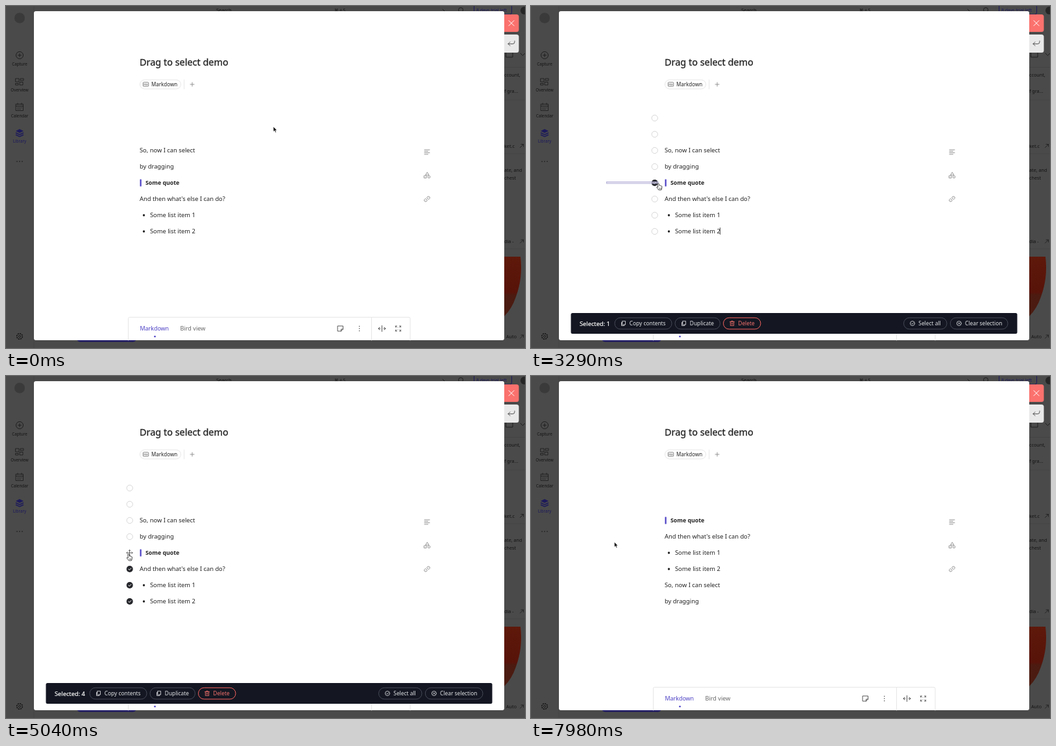
Write an HTML page that moves like this. It is 800 px wide and 528 px high and loops after 8 s.

```html
<!DOCTYPE html>
<html lang="en">
<head>
<meta charset="utf-8">
<title>Drag to select demo</title>
<style>
  html, body { margin: 0; width: 100%; height: 100%; overflow: hidden; background: #4a4a4a; }
  svg { display: block; width: 100vw; height: 100vh; }
  text { font-family: "Noto Sans", "Open Sans", sans-serif; font-size: 9.33px; fill: #222; white-space: pre; }
  .line { fill: none; stroke-linecap: round; stroke-linejoin: round; }
  .title { font-size: 14.45px; stroke: #222; stroke-width: .3px; }
  .dim text { font-size: 7.2px; fill: #141414; }
  .dim .label { font-size: 6.3px; text-anchor: middle; }
  .bar text { font-size: 8.35px; fill: #e4e4e8; }
  .bar .count { font-size: 9.25px; fill: #fff; stroke: #fff; stroke-width: .2px; }
</style>
</head>
<body>
<svg id="stage" viewBox="0 0 800 528" preserveAspectRatio="none"></svg>
<script>
const LOOP = 8000, STEP = 70;
const ROW_TOP = 173, ROW_GAP = 25;
const DRAG_START = 2870, DRAG_END = 4410, DROP = 6160;
const INK = '#222', PURPLE = '#4b3fc4';

const rowY = i => ROW_TOP + i * ROW_GAP;
const text = (x, y, s, attrs = '') => `<text x="${x}" y="${y}" ${attrs}>${s}</text>`;
const path = (d, stroke, width = 1, attrs = '') =>
  `<path class="line" d="${d}" stroke="${stroke}" stroke-width="${width}" ${attrs}/>`;
const box = (x, y, w, h, r, attrs) =>
  `<rect x="${x}" y="${y}" width="${w}" height="${h}" rx="${r}" ${attrs}/>`;
const dot = (x, y, r, fill) => `<circle cx="${x}" cy="${y}" r="${r}" fill="${fill}"/>`;
const at = (x, y, s, id = '') => `<g ${id && `id="${id}"`} transform="translate(${x} ${y})">${s}</g>`;

// Page behind the dialog
function backdrop() {
  const dark = '#151515', violet = '#1d1a5c';
  const label = (y, s, fill = dark) => text(21, y, s, `class="label" style="fill:${fill}"`);
  const out = (x, y) => at(x, y, path('M-2.5 2.5L2.5 -2.5M-1 -2.5H2.5V1', dark, .7));
  return `<g class="dim">
    ${box(0, 0, 800, 528, 0, 'fill="#4a4a4a"')}
    ${path('M43 0V528', '#434343', .8)}
    <circle cx="21" cy="18.5" r="8" fill="#3a3a3a"/>
    <circle cx="21" cy="76" r="5.5" fill="none" stroke="${dark}" stroke-width=".8"/>
    ${path('M21 73.5V78.5M18.5 76H23.5', dark, .8)}
    ${label(92, 'Capture')}
    ${path('M15 112H20V117H15ZM22.5 112H27V115H22.5ZM15 119.5H19V122H15ZM21.5 117.5H26V122H21.5Z', dark, .7)}
    ${label(132, 'Overview')}
    ${path('M15.5 151.5H26.5V161.5H15.5ZM15.5 154.5H26.5M18 150V152M24 150V152M18 157H19M21 157H22M24 157H24.5M18 159.3H19M21 159.3H22', dark, .7)}
    ${label(171.5, 'Calendar')}
    <path d="M21 190L27 193L21 196L15 193Z" fill="${violet}"/>
    ${path('M15.5 196L21 198.7L26.5 196M15.5 199L21 201.7L26.5 199', violet, 1.5)}
    ${label(211, 'Library', violet)}
    ${[17, 21, 25].map(x => dot(x, 240, .8, dark)).join('')}
    <circle cx="21" cy="510" r="4.3" fill="none" stroke="${dark}" stroke-width="1.5" stroke-dasharray="2.2 1.1"/>
    <circle cx="21" cy="510" r="1.6" fill="none" stroke="${dark}" stroke-width=".8"/>
    ${text(324, 9, 'Search', 'style="font-size:7.5px"')}
    ${text(506, 9, '⌘ + S', 'style="font-size:6.5px"')}
    ${path('M673 5L676 8', dark, .8)}
    <circle cx="701" cy="6" r="3.5" fill="none" stroke="${dark}" stroke-width=".8"/>
    ${box(721.5, -2, 58, 15, 3, `fill="none" stroke="${violet}"`)}
    ${text(725, 9, '8 days trial left', `style="font-size:6.8px;fill:${violet}"`)}
    ${dot(799, 7, 6, '#262626')}
    ${path('M771 71H781V79H771Z', dark, .8)}${path('M793 73L796.5 76.5L800 73', dark, .8)}
    ${path('M768 94.5H800M768 145H800M768 228H800M768 375H800', '#424242', .8)}
    ${text(768, 109, 'ccount,')}${text(768, 133.5, 'f gra...')}
    ${text(768, 219, 'ket.c')}${out(795, 216)}
    ${text(768, 256, 'ate, and')}${text(768, 268, 'chest')}
    ${text(768, 366, 'dia -')}${out(795, 363.5)}
    ${text(771, 513, 'Auto')}${out(795, 510.5)}
    <path d="M768 387H793Q797 419 786 449Q780 467 768 479Z" fill="url(#pie)"/>
    ${box(109, 508, 92, 10.5, 5, 'fill="#1f1a66"')}
  </g>`;
}

function dialog() {
  const grey = '#8b8b8b', dark = '#444';
  const chainLink = path('M-1 -2H-3A2 2 0 0 0 -3 2H-1M1 -2H3A2 2 0 0 1 3 2H1M-2 0H2', grey, .9, 'transform="rotate(-40)"');
  const corner = (sx, sy) => path('M2 4H4V2M4 4L1.7 1.7', dark, .8, `transform="scale(${sx} ${sy})"`);
  return `
    ${box(43, 8, 725, 508, 3, 'fill="#fff"')}
    <path d="M768 13H787Q790.5 13 790.5 16.5V36.5Q790.5 40 787 40H768Z" fill="#fb716d"/>
    ${path('M775 22.5L783 30.5M783 22.5L775 30.5', '#fff', 1)}
    <path d="M768 44H787Q790.5 44 790.5 47.5V68.5Q790.5 72 787 72H768Z" fill="#e9e9e9"/>
    ${path('M784 54V55.5Q784 58.5 781 58.5H774M777 55.5L774 58.5L777 61.5', '#444', .9)}
    ${text(206, 92.3, 'Drag to select demo', 'class="title"')}
    ${box(206.5, 114, 63, 14, 7, 'fill="#fff" stroke="#e4e4e4" stroke-width=".9"')}
    ${box(211.3, 117.8, 8.4, 6.2, 1, 'fill="none" stroke="#666" stroke-width=".8"')}
    ${path('M213 122.3V119.8L214.2 121.3L215.4 119.8V122.3M217.4 119.8V122M216.6 121.3L217.4 122.2L218.2 121.3', '#666', .6)}
    ${text(224, 124, 'Markdown', 'style="font-size:8px"')}
    ${path('M274.5 114V128', '#e8e8e8')}
    ${path('M284 121H290M287 118V124', grey, .9)}
    ${path('M645 222H653M645 224.3H650.5M645 226.6H653M645 229H650.5', grey, .9)}
    ${path('M649.5 257L652 261H647ZM644.7 262H648V265.5H644.7Z', grey, .9)}
    <circle cx="652" cy="263.8" r="1.8" fill="none" stroke="${grey}" stroke-width=".9"/>
    ${at(649, 298, chainLink)}
    ${path('M188.5 516V482.5Q188.5 480.5 190.5 480.5H621Q623 480.5 623 482.5V516M563.5 480.5V516', '#e6e6e6')}
    ${text(206.5, 501, 'Markdown', `style="font-size:8.9px;fill:${PURPLE}"`)}
    ${text(268.5, 501, 'Bird view', 'style="font-size:9.1px;fill:#666"')}
    ${dot(229.5, 510.3, 1.3, PURPLE)}
    ${path('M511.5 494H519.5V499L516.5 502H511.5ZM519.5 499H516.5V502', dark, .9)}
    ${[494.5, 498, 501.5].map(y => dot(544.7, y, .75, dark)).join('')}
    ${path('M579.5 493.5V502.5M577 498H574M582 498H585M576 496L574 498L576 500M583 496L585 498L583 500', dark, .9)}
    ${at(604.5, 498, corner(1, 1) + corner(-1, 1) + corner(1, -1) + corner(-1, -1))}`;
}

const quote = box(206.5, -5.5, 2.2, 11, .5, `fill="${PURPLE}"`) +
  text(215, 3.3, 'Some quote', 'style="font-size:8.8px;font-weight:600"');
const item = s => dot(212.5, 0, 1.7, INK) + text(222, 3.3, s);

// Each block knows its row before and after the drop.
const blocks = [
  { body: text(206, 3.3, 'So, now I can select'), from: 2, to: 6 },
  { body: text(206, 3.3, 'by dragging'), from: 3, to: 7 },
  { body: quote, from: 4, to: 2 },
  { body: text(206, 3.3, 'And then what\'s else I can do?'), from: 5, to: 3 },
  { body: item('Some list item 1'), from: 6, to: 4 },
  { body: item('Some list item 2'), from: 7, to: 5 },
];

function toolbar() {
  const copy = 'M-1.5 -3.5H3V2H-1.5ZM-1.5 -1.5H-3V3.5H1.3V2';
  const button = (x, w, icon, label, stroke = '#454956', ink = '#e4e4e8') =>
    box(x, 481.3, w, 17.6, 8.8, `fill="none" stroke="${stroke}"`) +
    at(x + 13.5, 490, path(icon, ink, .8)) +
    text(x + 22.8, 493.2, label, `style="fill:${ink}"`);
  const ring = 'M3.5 0A3.5 3.5 0 1 1 -3.5 0A3.5 3.5 0 1 1 3.5 0';
  return `<g class="bar" id="toolbar">
    ${box(61.5, 474, 688, 32, 2.5, 'fill="#141722"')}
    ${text(75, 493.5, 'Selected: 1', 'id="count" class="count"')}
    ${button(129, 88, copy, 'Copy contents')}
    ${button(222, 69.5, copy, 'Duplicate')}
    ${button(296.5, 57.5, 'M-3.5 -2.5H3.5M-1.2 -2.5V-3.7H1.2V-2.5M-2.7 -2.5V3.5H2.7V-2.5M-.9 -.8V1.8M.9 -.8V1.8', 'Delete', '#f4625e', '#f4716d')}
    ${button(574.5, 66.5, ring + 'M-1.5 0L-.3 1.2L1.7 -1.1', 'Select all')}
    ${button(646.3, 88.7, ring + 'M-1.2 -1.2L1.2 1.2M1.2 -1.2L-1.2 1.2', 'Clear selection')}
  </g>`;
}

const handle = y => [-3.5, 0, 3.5].map(d =>
  dot(188.6, y + d, .75, '#777') + dot(192.8, y + d, .75, '#777')).join('');

function hoverRow(i, onHandle) {
  const y = rowY(i);
  return box(179.5, y - 12.2, 451.5, 24.6, 1.5, 'fill="none" stroke="#e2e2e2" stroke-width=".9" stroke-dasharray="3 1"') +
    (onHandle ? box(180, y - 12, 21.5, 24, 1.5, 'fill="#e9e9e9"') : '') +
    handle(y) +
    (i < 2 ? text(206, y + 3.3, 'Start typing or use / to browse...', 'style="fill:#6f6f6f"') : '') +
    at(620.3, y, path('M-4 -3H4M-1.5 -3V-4.3H1.5V-3M-3 -3V4.3H3V-3M-1 -.8V2.3M1 -.8V2.3', '#5c5c5c', .8));
}

function marker(i, selected, moving) {
  const y = rowY(i);
  if (moving) return at(190.5, y, path('M0 -4.5V4.5M-4.5 0H4.5M-1.3 -3.4L0 -4.7L1.3 -3.4M-1.3 3.4L0 4.7L1.3 3.4M-3.4 -1.3L-4.7 0L-3.4 1.3M3.4 -1.3L4.7 0L3.4 1.3', '#555', .9));
  if (selected) return dot(190.7, y, 5, '#26272c') +
    at(190.7, y, path('M-2 0L-.5 1.5L2.1 -1.3', '#fff', 1));
  return `<circle cx="190.7" cy="${y}" r="4.6" fill="#fff" stroke="#cdcdcd" stroke-width=".8"/>`;
}

const arrow = '<path d="M0 0V8.3L1.9 6.6L3.2 9.4L4.7 8.7L3.5 6H5.9Z" fill="#111" stroke="#fff" stroke-width=".8"/>';
const hand = '<path d="M-.8 .4Q.2 -.9 1.2 .4L1.7 3.2Q2.6 2.5 3.2 3.4Q4.2 2.9 4.6 3.9Q5.8 3.5 5.9 5L5.6 8L4.9 10H.8L-1.2 7.5L-2.3 5.8Q-2 4.7 -.9 5.3L-.2 5.9Z" fill="#fff" stroke="#222" stroke-width=".8"/>' +
  path('M1.6 7V8.6M3 7V8.6M4.3 7V8.6', '#222', .5);

// Pointer keys: time, x, y
const keys = [
  [0, 412, 186], [560, 412, 186], [1330, 153, 277], [1470, 137, 250], [1680, 137, 250],
  [1960, 121, 270.5], [2100, 121, 270.5], [2380, 116, 270.5], [2800, 116, 270.5],
  [3290, 196, 274], [3640, 268, 312], [3850, 302, 332], [4410, 325, 352], [4480, 325, 352],
  [5040, 188.5, 275], [5460, 188.5, 275], [5880, 200, 209], [6720, 200, 209],
  [7140, 265, 318], [7490, 190, 325], [7980, 128.3, 256], [8000, 128.3, 256],
];

// Smooth slope at a key, zero at rests and turns
function slope(i, c) {
  if (i < 1 || i > keys.length - 2) return 0;
  const rate = k => (keys[k + 1][c] - keys[k][c]) / (keys[k + 1][0] - keys[k][0]);
  const a = rate(i - 1), b = rate(i);
  return a * b <= 0 ? 0 : 2 * a * b / (a + b);
}

function pointer(t) {
  let i = 0;
  while (i < keys.length - 2 && keys[i + 1][0] <= t) i++;
  const span = keys[i + 1][0] - keys[i][0], u = (t - keys[i][0]) / span;
  return [1, 2].map(c => {
    const p = keys[i][c], q = keys[i + 1][c], v = 1 - u;
    return p * (1 + 2 * u) * v * v + q * u * u * (3 - 2 * u) +
      span * u * v * (slope(i, c) * v - slope(i + 1, c) * u);
  });
}

const stage = document.getElementById('stage');
stage.innerHTML = `
  <defs><linearGradient id="pie" x1="0" y1="0" x2="0" y2="1">
    <stop offset="0" stop-color="#5e190b"/><stop offset=".6" stop-color="#581309"/>
    <stop offset=".64" stop-color="#4c1a10"/><stop offset="1" stop-color="#4a1c12"/>
  </linearGradient></defs>
  ${backdrop()}${dialog()}
  <g id="hover"></g>
  ${blocks.map((b, i) => at(0, rowY(b.from), b.body, 'block' + i)).join('')}
  ${box(291, 342, 1, 11, 0, 'id="caret" fill="#555"')}
  <g id="marks"></g>
  ${toolbar()}
  <rect id="lasso" x="116.5" y="271.5" fill="rgba(216,213,234,.57)" stroke="#b0abd6" stroke-width=".9"/>
  <g id="cursor"><g id="arrow">${arrow}</g><g id="hand">${hand}</g></g>`;

const $ = id => document.getElementById(id);
const show = (id, on) => $(id).setAttribute('display', on ? 'inline' : 'none');
const place = (id, x, y) => $(id).setAttribute('transform', `translate(${x} ${y})`);
const startX = 116, startY = 271;

function draw(time) {
  const t = Math.floor(time / STEP) * STEP;
  const [x, y] = pointer(t);
  const dropped = t >= DROP;
  const dragging = t >= DRAG_START && t < DRAG_END;
  const selecting = t >= DRAG_START && !dropped && (!dragging || x > 184);
  const onGutter = x > 180 && x < 202;

  blocks.forEach((b, i) => place('block' + i, 0, rowY(dropped ? b.to : b.from)));

  const bottom = dragging ? y : 352;
  const picked = i => rowY(i) + 12.5 > startY && rowY(i) - 12.5 < bottom;
  const rows = [0, 1, 2, 3, 4, 5, 6, 7];
  const overMark = i => !dragging && Math.hypot(x - 190.7, y - rowY(i)) < 7;
  $('marks').innerHTML = selecting
    ? rows.map(i => marker(i, picked(i), picked(i) && overMark(i))).join('')
    : t >= 2100 && !dropped ? handle(rowY(7)) : '';
  show('toolbar', selecting);
  $('count').textContent = 'Selected: ' + rows.filter(picked).length;

  let hover = '';
  if (dropped && t <= 6720) hover = hoverRow(2, false) + hoverRow(1, true);
  else if (!selecting && x > 180 && x < 632 && y > 188) {
    const i = Math.round((y - ROW_TOP) / ROW_GAP);
    if (i < 8) hover = hoverRow(i, onGutter);
  }
  $('hover').innerHTML = hover;

  show('caret', t >= 2100 && t < 2590 || t >= DRAG_START && t < 4480);
  show('lasso', dragging && x > startX + 1);
  $('lasso').setAttribute('width', Math.max(0, x - startX - .5));
  $('lasso').setAttribute('height', Math.max(1.5, y - startY - .5));

  const pointing = dragging || onGutter && t > 2100;
  show('hand', pointing);
  show('arrow', !pointing);
  place('cursor', x, y);
}

function tick() {
  draw(performance.now() % LOOP);
  requestAnimationFrame(tick);
}
tick();
</script>
</body>
</html>
```
